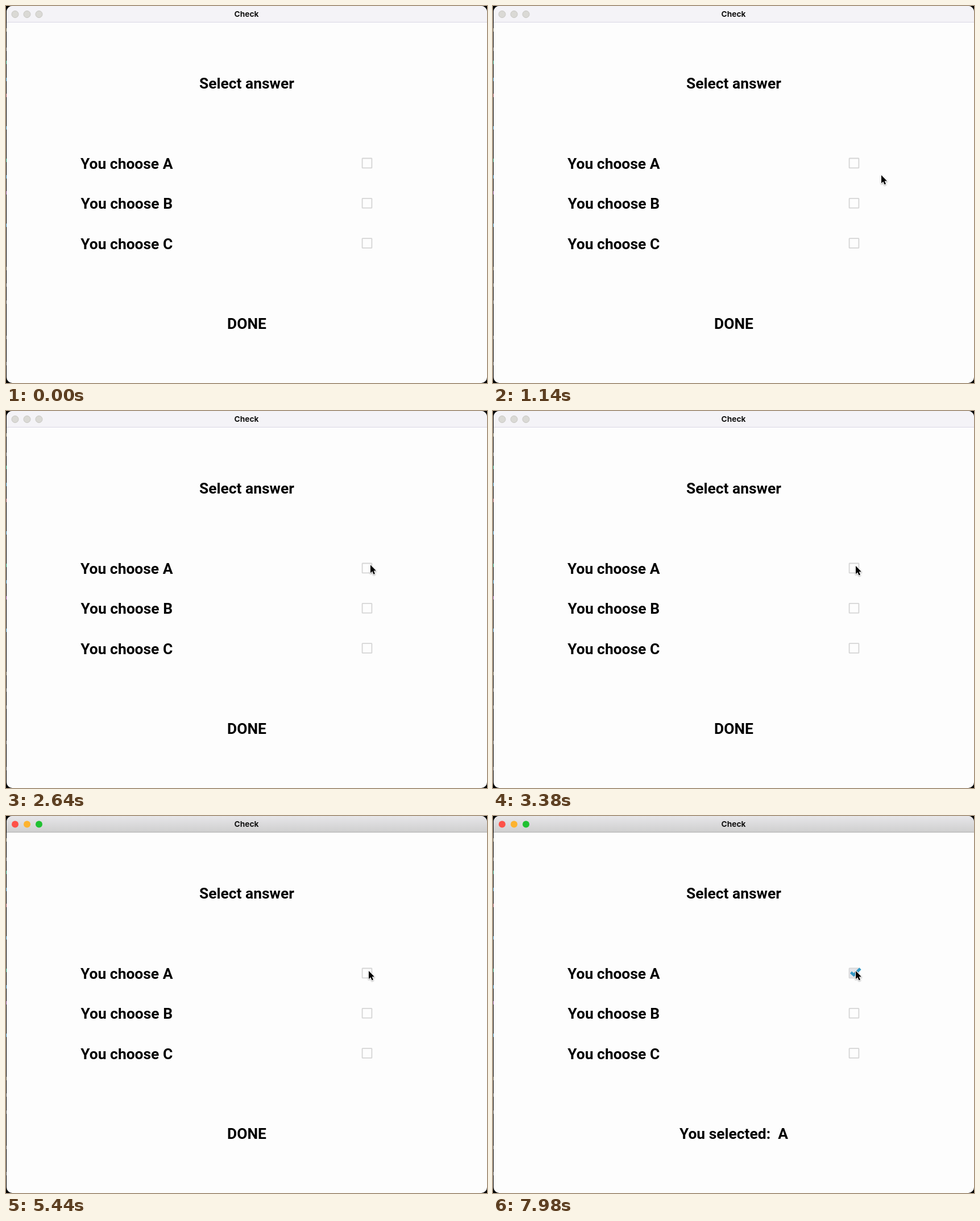
An HTML page for the animation above (8 s loop, 846 by 662 pixels).

```html
<!DOCTYPE html>
<html lang="en">
<head>
<meta charset="utf-8">
<title>Check</title>
<style>
  html, body { margin: 0; width: 100%; height: 100%; overflow: hidden; background: #000; }
  svg { display: block; width: 846px; height: 662px; }
  .label { font: 700 26.4px Roboto, sans-serif; text-anchor: middle; }
  .title { font: 700 13.7px Inter, sans-serif; text-anchor: middle; fill: #111; }
  .box { fill: none; stroke: #d5d5d5; stroke-width: 1.8; }
  .idle circle { fill: #dad9d5; stroke: #c8c7c3; }
  #cursor { filter: drop-shadow(0 1px 1.2px rgba(0, 0, 0, .35)); }
</style>
</head>
<body>
<svg viewBox="0 0 846 662">
  <defs>
    <linearGradient id="chrome" x2="0" y2="1">
      <stop stop-color="#e7e6e9"/>
      <stop offset="1" stop-color="#cfcfcf"/>
    </linearGradient>
    <clipPath id="frame"><rect x="1" width="845" height="662" rx="10"/></clipPath>
  </defs>

  <g id="specks"></g>
  <g clip-path="url(#frame)">
    <rect width="846" height="662" fill="#fdfdfd"/>
    <g id="inactive" class="idle">
      <rect width="846" height="28" fill="#f4f3f7"/>
      <rect y="28" width="846" height="1" fill="#d9d7e5"/>
    </g>
    <g id="active">
      <rect width="846" height="28" fill="url(#chrome)"/>
      <rect y="28" width="846" height="1" fill="#afafaf"/>
    </g>
    <text class="title" x="423" y="19">Check</text>

    <text class="label" x="423.5" y="144.8">Select answer</text>
    <g id="rows"></g>
    <text class="label" id="done" x="423.5" y="567.2">DONE</text>
    <g id="picked">
      <text class="label" x="423.5" y="567.2" xml:space="preserve">You selected:  A</text>
      <rect x="627" y="268" width="16" height="16" fill="#e4e4e9"/>
      <path d="M629.5 274.5l5 4.5L646 268" fill="none" stroke="#3298c5" stroke-width="4.6"/>
    </g>
    <g id="cursor">
      <path d="M0 0V14.2L3.3 11.2L5.6 16.6L8 15.6L5.7 10.3H10Z"
            stroke="#fff" stroke-width="2" paint-order="stroke" stroke-linejoin="round"/>
    </g>
  </g>
</svg>
<script>
  const LOOP = 8000, ACTIVATE = 4840, SELECT = 6580;
  const $ = id => document.getElementById(id);

  function add(parent, tag, attrs, text = '') {
    const el = document.createElementNS('http://www.w3.org/2000/svg', tag);
    for (const name in attrs) el.setAttribute(name, attrs[name]);
    el.textContent = text;
    return parent.appendChild(el);
  }

  function play(id, frames) {
    const anim = $(id).animate(frames, { duration: LOOP, iterations: Infinity });
    anim.startTime = 0;
    return anim;
  }

  // Hard switch between hidden and shown at a given time.
  function toggle(id, time, showsAfter) {
    const [before, after] = showsAfter ? [0, 1] : [1, 0], offset = time / LOOP;
    return play(id, [
      { opacity: before, offset: 0 }, { opacity: before, offset },
      { opacity: after, offset }, { opacity: after, offset: 1 }
    ]);
  }

  ['#fe5148', '#fdb32f', '#20c132'].forEach((fill, i) => {
    const place = { cx: 16 + 21 * i, cy: 14.5, r: 6 };
    add($('inactive'), 'circle', place);
    add($('active'), 'circle', { ...place, fill });
  });

  [...'ABC'].forEach((letter, i) => {
    const y = 70.33 * i;
    add($('rows'), 'text', { class: 'label', x: 212.3, y: 285.9 + y }, 'You choose ' + letter);
    add($('rows'), 'rect', { class: 'box', x: 626.6, y: 267.5 + y, width: 16.8, height: 16.8, rx: .6 });
  });

  const specks = [
    [42, '#77715b'], [76, '#555'], [99, '#168b68'], [129, '#2878a5'], [157, '#a04c58'],
    [214, '#3984ae'], [271, '#159067'], [300, '#2878a5'], [328, '#86488f'], [385, '#3984ae'],
    [461, '#625c48'], [490, '#555'], [520, '#555'], [582, '#555'], [628, '#555']
  ];
  for (const [y, fill] of specks) add($('specks'), 'rect', { x: 0, y: y - 3, width: 1, height: 6, fill });

  // Pointer path: time, x, y of the tip.
  const path = [
    [0, 801, -30], [260, 801, -30], [480, 775, 110], [680, 722, 236], [840, 695, 284],
    [1000, 685, 296], [1140, 683, 297], [1560, 680, 296], [1700, 674, 292], [1860, 655, 276],
    [1980, 645, 267], [2400, 645, 267], [2700, 640, 271], [2900, 638, 272], [LOOP, 638, 272]
  ];

  const anims = [
    toggle('inactive', ACTIVATE, false), toggle('active', ACTIVATE, true),
    toggle('done', SELECT, false), toggle('picked', SELECT, true),
    play('cursor', path.map(([t, x, y]) => ({ offset: t / LOOP, transform: `translate(${x}px, ${y}px)` })))
  ];
  const start = performance.now();
  for (const anim of anims) anim.startTime = start;
</script>
</body>
</html>
```
